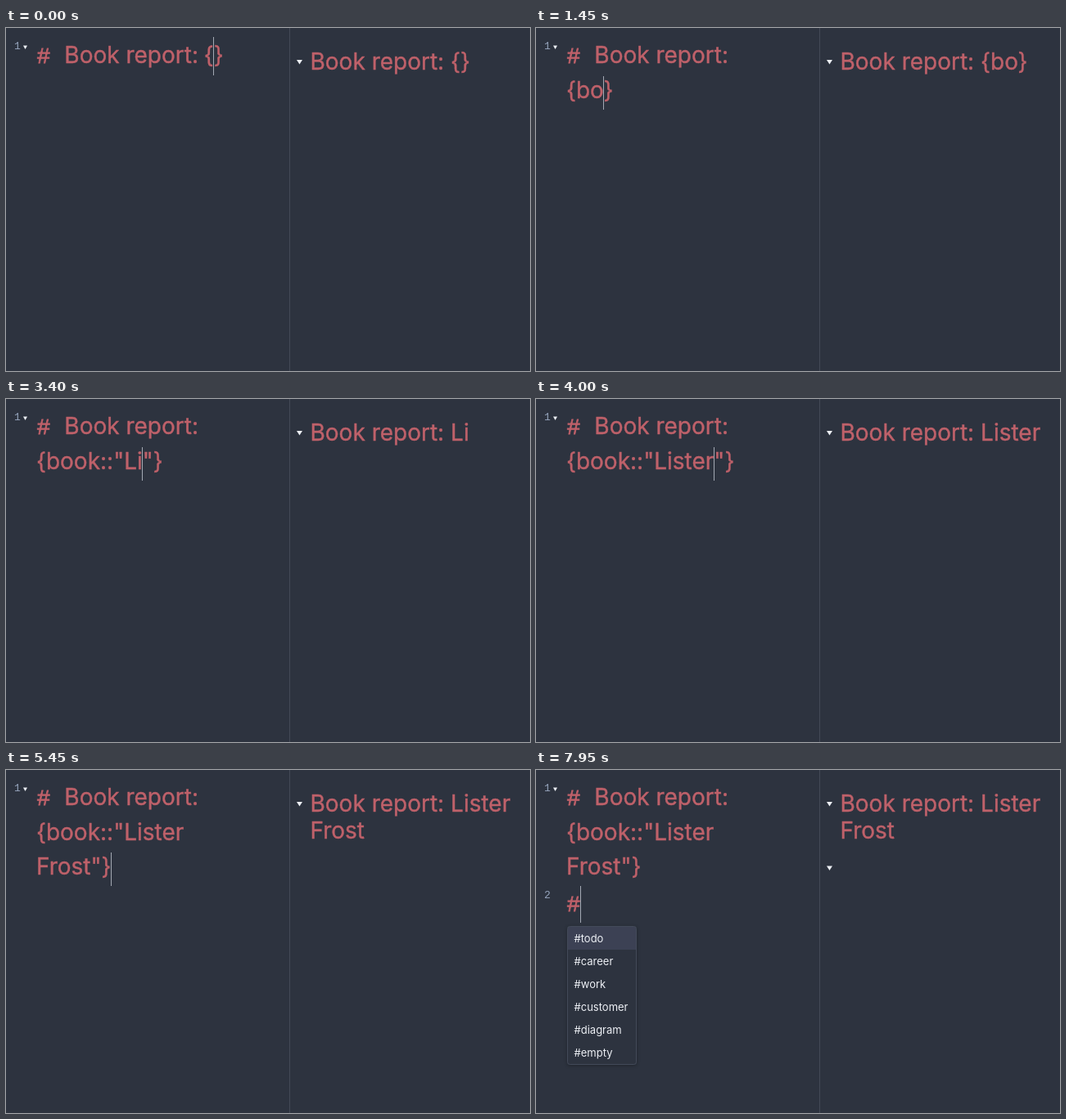
Write an HTML page with a canvas that moves like this. It is 640 px wide and 420 px high and loops after 8 s.

```html
<!DOCTYPE html>
<html lang="en">
<head>
<meta charset="utf-8">
<title>Note editor with live preview</title>
<style>
html, body { margin: 0; width: 100%; height: 100%; overflow: hidden; background: #2d333f; }
canvas { display: block; width: 640px; height: 420px; }
</style>
</head>
<body>
<canvas id="stage" width="640" height="420"></canvas>
<script>
const ctx = document.getElementById('stage').getContext('2d');
const LOOP = 8000;
const RED = '#bf616a', WHITE = '#eceff4', GUTTER = '#94a3bb', CARET = '#a3a9b3';
const SANS = 'Inter, sans-serif', MONO = '"Liberation Mono", monospace';
const HEAD = '28px ' + SANS, MARK = '28px ' + MONO;

const title = 'Lister Frost';
const open = 'book::"';
const keys = open + title + '"}';
const keyTimes = [550, 1450, 1650, 1950, 2250, 2550, 3050, 3200, 3400, 3550, 3700,
  3850, 4000, 4100, 4250, 4450, 4600, 4700, 4850, 5000, 5450];
const ENTER = 5900, MENTION = 6950, ERASE = 7600, TAG = 7900;
const caretOff = [[50, 550], [1100, 1450], [6400, MENTION], [7550, ERASE]];
const LEFT = 37, RIGHT = 371.5;

function text(str, x, y, font, color) {
  ctx.font = font;
  ctx.fillStyle = color;
  ctx.fillText(str, x, y);
}

// Large red text with slightly heavier strokes.
function heading(str, x, y, font = HEAD, weight = 0.4) {
  text(str, x, y, font, RED);
  ctx.strokeStyle = RED;
  ctx.lineWidth = weight;
  ctx.strokeText(str, x, y);
}

function width(str, font) {
  ctx.font = font;
  return ctx.measureText(str).width;
}

function rect(x, y, w, h, color) {
  ctx.fillStyle = color;
  ctx.fillRect(x, y, w, h);
}

function arrow(x, y, w, h) {
  ctx.fillStyle = WHITE;
  ctx.beginPath();
  ctx.moveTo(x - w / 2, y);
  ctx.lineTo(x + w / 2, y);
  ctx.lineTo(x, y + h);
  ctx.fill();
}

function menu(x, y, w, h, items, pad) {
  ctx.save();
  ctx.shadowColor = 'rgba(0,0,0,.3)';
  ctx.shadowBlur = 4;
  ctx.shadowOffsetY = 1;
  ctx.fillStyle = '#2d333f';
  ctx.beginPath();
  ctx.roundRect(x, y, w, h, 3);
  ctx.fill();
  ctx.restore();
  rect(x + 1, y + 1, w - 2, 28, '#3c4154');
  ctx.strokeStyle = '#434a59';
  ctx.lineWidth = 1;
  ctx.beginPath();
  ctx.roundRect(x + 0.5, y + 0.5, w - 1, h - 1, 3);
  ctx.stroke();
  items.forEach((s, i) => text(s, x + pad, y + 20 + i * 28, '13px ' + SANS, WHITE));
}

function editor(t, n) {
  text('1', 10, 26, '13px ' + MONO, GUTTER);
  arrow(23.5, 21.5, 5, 4.5);
  heading('#', LEFT + 0.5, 43, MARK, 0.8);
  const start = LEFT + 0.7 + width('# ', MARK);
  heading('Book report:', start, 43);

  const before = '{' + keys.slice(0, n);
  const after = n > 20 ? '' : n > 19 || n < 7 ? '}' : '"}';
  const split = n > 15 ? before.indexOf(' ') + 1 : 0;
  let x = LEFT, y = 86, line = before;
  if (n < 2) {
    x = start + width('Book report: ', HEAD) - 1;
    y = 43;
  }
  if (split) {
    heading(before.slice(0, split), LEFT, 86);
    line = before.slice(split);
    y = 128;
  }
  heading(line + after, x, y);

  const first = y === 43;
  let caret = { x: x + width(line, HEAD), y: first ? 11 : y - 27, h: first ? 47 : 41, color: CARET };
  if (t >= ENTER) {
    text('2', 10, 157, '13px ' + MONO, GUTTER);
    caret = { x: LEFT, y: 143, h: 19, color: CARET };
    if (t >= MENTION && t < ERASE) {
      text('@', LEFT, 157, '14px ' + SANS, WHITE);
      caret.x = 49;
      if (t < 7050) caret.color = RED;
      menu(49, 162, 82, 96, ['Today', 'Yesterday', 'Tomorrow'], 10);
    }
    if (t >= TAG) {
      heading('#', LEFT + 0.5, 173, MARK, 0.8);
      caret.x = 54.5;
      caret.y = 142;
      caret.h = 45;
    }
    if (t >= 7950) {
      menu(38, 191, 85, 170, ['#todo', '#career', '#work', '#customer', '#diagram', '#empty'], 8.5);
    }
  }
  if (!caretOff.some(([a, b]) => t >= a && t < b)) {
    rect(Math.floor(caret.x), caret.y, 1, caret.h, caret.color);
  }
}

function preview(t, n) {
  arrow(358.5, 39, 7, 5.5);
  let first = '', second = '';
  if (n < 7) {
    const raw = '{' + keys.slice(0, n) + '}';
    if (n < 5) first = raw;
    else second = raw;
  } else {
    [first, second = ''] = title.slice(0, n - open.length).split(' ');
  }
  heading('Book report: ' + first, RIGHT, 51);
  heading(second, RIGHT, 84);
  if (t >= MENTION && t < ERASE) text('@', RIGHT, 119, '14px ' + SANS, WHITE);
  if (t >= TAG) arrow(358.5, 117.5, 7, 5.5);
}

function draw(t) {
  rect(0, 0, 640, 420, '#2d333f');
  rect(346, 0, 1, 420, '#434956');
  const n = keyTimes.filter(k => k <= t).length;
  editor(t, n);
  preview(t, t < 700 ? 0 : n);
}

const t0 = performance.now();
function tick() {
  draw((performance.now() - t0) % LOOP);
  requestAnimationFrame(tick);
}
draw(0);
requestAnimationFrame(tick);
</script>
</body>
</html>
```
